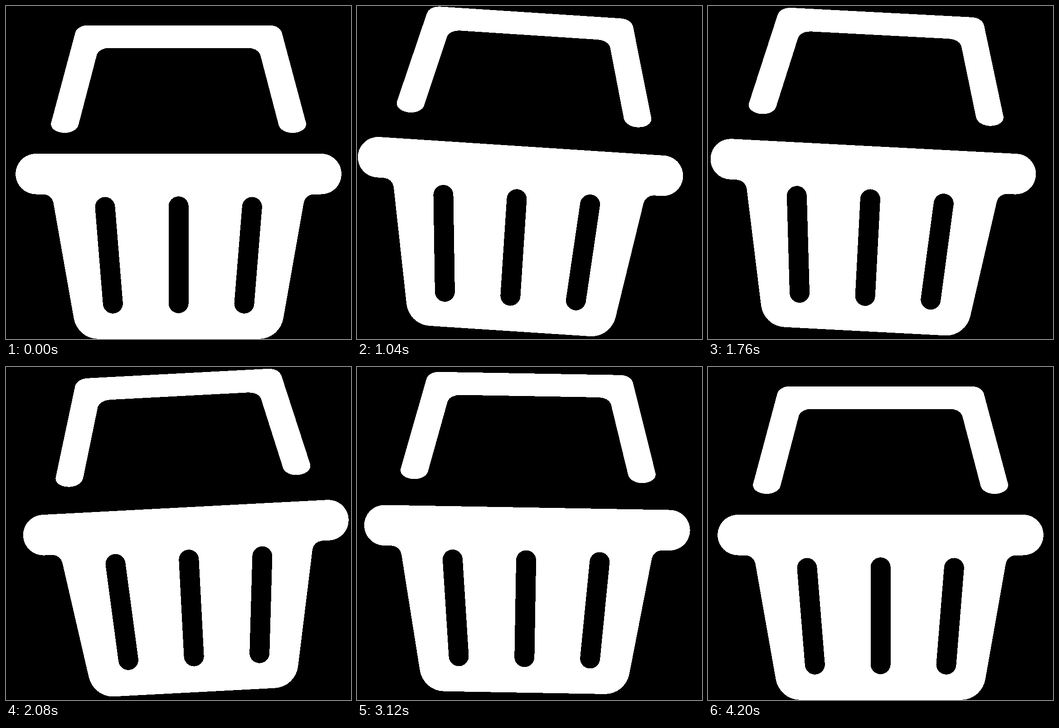
These frames come from a looping animation (761x735 px, 5.24 s). An HTML page:

```html
<!DOCTYPE html>
<html lang="en">
<head>
<meta charset="utf-8">
<title>Shopping basket</title>
<style>
  html, body { margin: 0; width: 100%; height: 100%; overflow: hidden; background: #000; }
  svg { display: block; width: 100%; height: 100%; fill: #fff; shape-rendering: crispEdges; }
  #slots { stroke: #000; stroke-width: 44; stroke-linecap: round; fill: none; }
</style>
</head>
<body>
<!-- Each part is its left half; the right half is added as a mirror image. -->
<svg viewBox="0 0 761 735">
  <g id="handle">
    <path d="M382 42.5H181C167 42.5 155 49 152.5 60L99.5 258C97 271 112 280 129.5 280
      C144 280 157.5 273 160 262L200.5 107C204 98 215 92.5 229 92.5H382Z"/>
  </g>
  <g id="body">
    <path d="M382 326H66A44.7 44.7 0 0 0 66 415.5H82C93 415.5 102.5 423 104.5 434
      L149.5 689C154 715 176 734.8 203 734.8H382Z"/>
  </g>
  <g id="slots">
    <path d="M218.5 443.5L235.8 656.7M380.7 442.3V656"/>
  </g>
</svg>
<script>
  const LOOP = 5240, STEP = 40;
  const SWING_START = 640, FIRST_PEAK = 1120, HALF_SWING = 320, SWINGS = 6;
  const SETTLE = 400, LOWER_START = 3520;

  const sine = u => (1 - Math.cos(Math.PI * u)) / 2;
  const easeOut = u => 1 - (1 - u) ** 2;
  const ramp = (t, from, to, ease = sine) =>
    ease(Math.min(1, Math.max(0, (t - from) / (to - from))));

  // Peaks alternate sides and lose one degree after each full swing.
  const peak = k => (k % 2 ? -1 : 1) * (4 - Math.floor(k / 2));

  function swing(t) {
    let angle = peak(0) * ramp(t, SWING_START, FIRST_PEAK);
    let time = FIRST_PEAK;
    for (let k = 1; k < SWINGS; k++, time += HALF_SWING) {
      angle += (peak(k) - peak(k - 1)) * ramp(t, time, time + HALF_SWING);
    }
    const last = peak(SWINGS);
    angle += (last - peak(SWINGS - 1)) * ramp(t, time, time + SETTLE);
    return angle - last * ramp(t, time + SETTLE, time + 2 * SETTLE);
  }

  const handleLift = t => -28.2 * (ramp(t, 280, 640) - ramp(t, LOWER_START, 3960));
  const bodyLift = t => -15.9 * (ramp(t, 0, 640) - ramp(t, LOWER_START, 4200, easeOut));

  function makePart(id, lift, pivot) {
    const node = document.getElementById(id);
    const mirror = node.firstElementChild.cloneNode();
    mirror.setAttribute('transform', 'translate(761.3 0) scale(-1 1)');
    node.append(mirror);
    return { node, lift, pivot };
  }

  const parts = [
    makePart('handle', handleLift, '380.5 45'),
    makePart('body', bodyLift, '380.5 46'),
    makePart('slots', bodyLift, '368 -8')
  ];

  function draw(time) {
    const t = Math.floor((time % LOOP) / STEP) * STEP;
    const angle = swing(t);
    for (const { node, lift, pivot } of parts) {
      node.setAttribute('transform', `rotate(${angle} ${pivot}) translate(0 ${lift(t)})`);
    }
  }

  const start = performance.now();
  function tick() {
    draw(performance.now() - start);
    requestAnimationFrame(tick);
  }
  tick();
</script>
</body>
</html>
```
